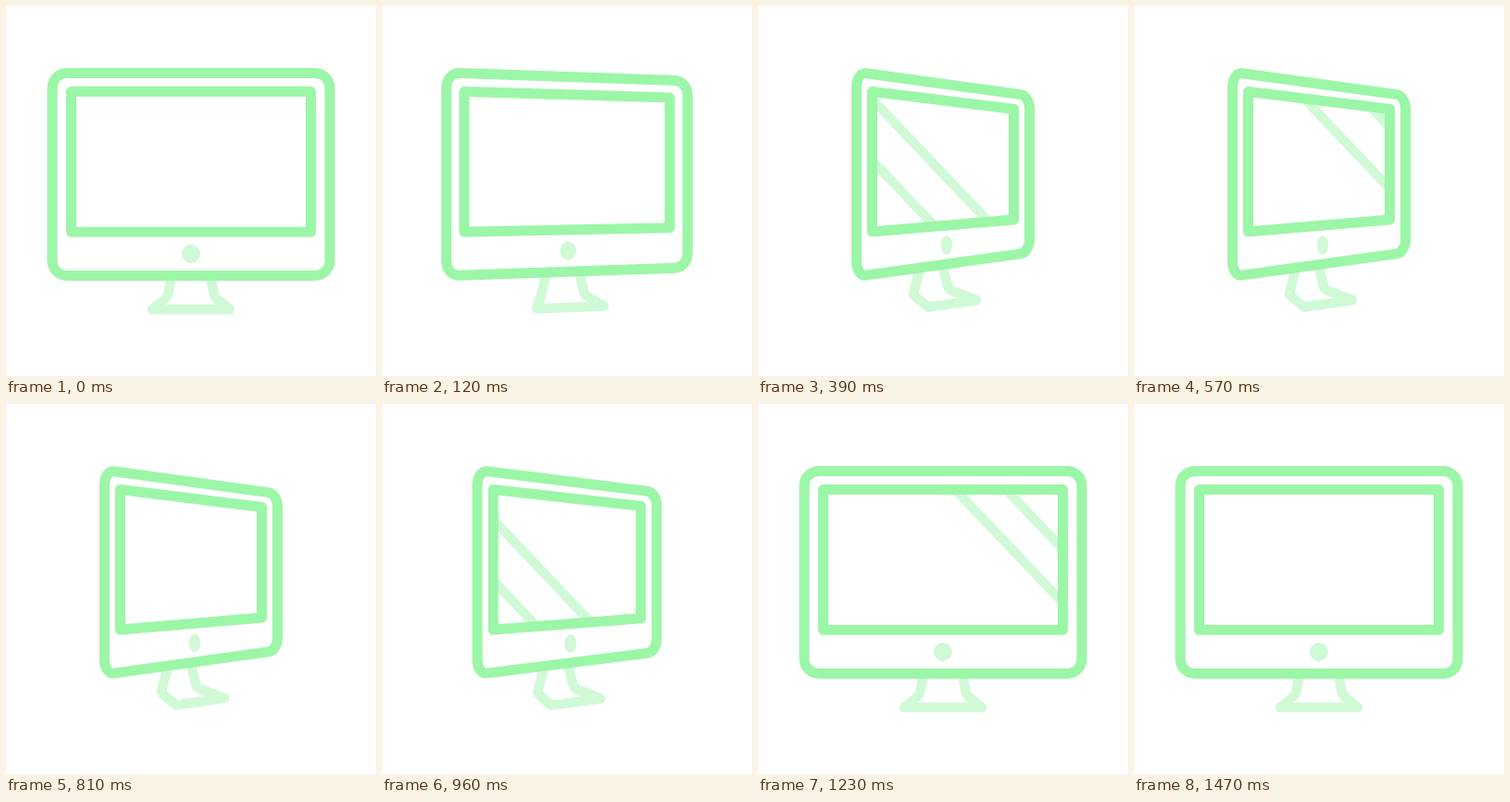
These frames come from a looping animation (400 by 400 pixels, 1620 ms). An HTML page:

```html
<!DOCTYPE html>
<html lang="en">
<head>
<meta charset="utf-8">
<title>Turning monitor</title>
<style>
  html, body { margin: 0; width: 100%; height: 100%; overflow: hidden; background: #fff; }
  svg { display: block; width: 100vw; height: 100vh; }
  path { fill: none; stroke-linecap: round; stroke-linejoin: round; }

  .dark { stroke: #9cf6a7; stroke-width: 11; }
  .light { stroke: #d0f9d6; stroke-width: 10.5; }

  /* Every shape morphs between its front and side outline. */
  .turn { d: var(--front); animation: turn 1620ms cubic-bezier(.45, 0, .55, 1) infinite; }
  @keyframes turn {
    0%, 74.07%, 100% { d: var(--front); }
    18.02%, 56.05% { d: var(--side); }
  }

  .case {
    --front: path("M66 72.5 L334 72.5 C343 72.5 350 79.5 350 88.5 L350 275.5 C350 284.5 343 291.5 334 291.5 L66 291.5 C57 291.5 50 284.5 50 275.5 L50 88.5 C50 79.5 57 72.5 66 72.5 Z");
    --side: path("M116.5 72.8 L283.5 95.6 C289.5 96.4 293.5 103 293.5 111 L293.5 253 C293.5 260 289.5 267 283.5 267.9 L116.5 291.1 C111 291.9 106.5 285 106.5 277 L106.5 87 C106.5 79 111 72 116.5 72.8 Z");
  }
  .screen {
    --front: path("M70.5 92.5 L329.5 92.5 L329.5 244.3 L70.5 244.3 Z");
    --side: path("M123.5 92.5 L276.5 111.5 L276.5 231 L123.5 244 Z");
  }
  .stand {
    --front: path("M179 292 L175.5 310 Q174.5 315 171 317.5 L158 328 L242 328 L229 317.5 Q225.5 315 224.5 310 L221 292");
    --side: path("M175 284 L168.5 309 Q167.5 312 170 314 L184 325.5 L236 318 L209 307.5 Q206.5 306.5 205.5 304 L199.5 280");
  }
  .button {
    fill: #d0f9d6;
    --front: path("M210 268 A10 10 0 1 1 190 268 A10 10 0 1 1 210 268 Z");
    --side: path("M210.3 258.5 A6.3 10 0 1 1 197.7 258.5 A6.3 10 0 1 1 210.3 258.5 Z");
  }
  .glare {
    stroke-width: 10;
    --front: path("M-36 60 L173 280 M19 60 L228 280");
    --side: path("M-36 60 L173 280 M27 60 L236 280");
  }

  /* The glare crosses the screen twice per loop. */
  .sweep { animation: sweep 1620ms linear infinite; }
  @keyframes sweep {
    0% { transform: translateX(-212px); }
    48.14% { transform: translateX(326px); }
    48.15% { transform: translateX(-93px); }
    92.59%, 100% { transform: translateX(404px); }
  }
</style>
</head>
<body>
<svg viewBox="0 0 400 400">
  <clipPath id="glass"><path class="turn screen"/></clipPath>
  <path class="turn stand light"/>
  <path class="turn button"/>
  <g clip-path="url(#glass)">
    <g class="sweep"><path class="turn glare light"/></g>
  </g>
  <path class="turn screen dark"/>
  <path class="turn case dark"/>
</svg>
</body>
</html>
```
